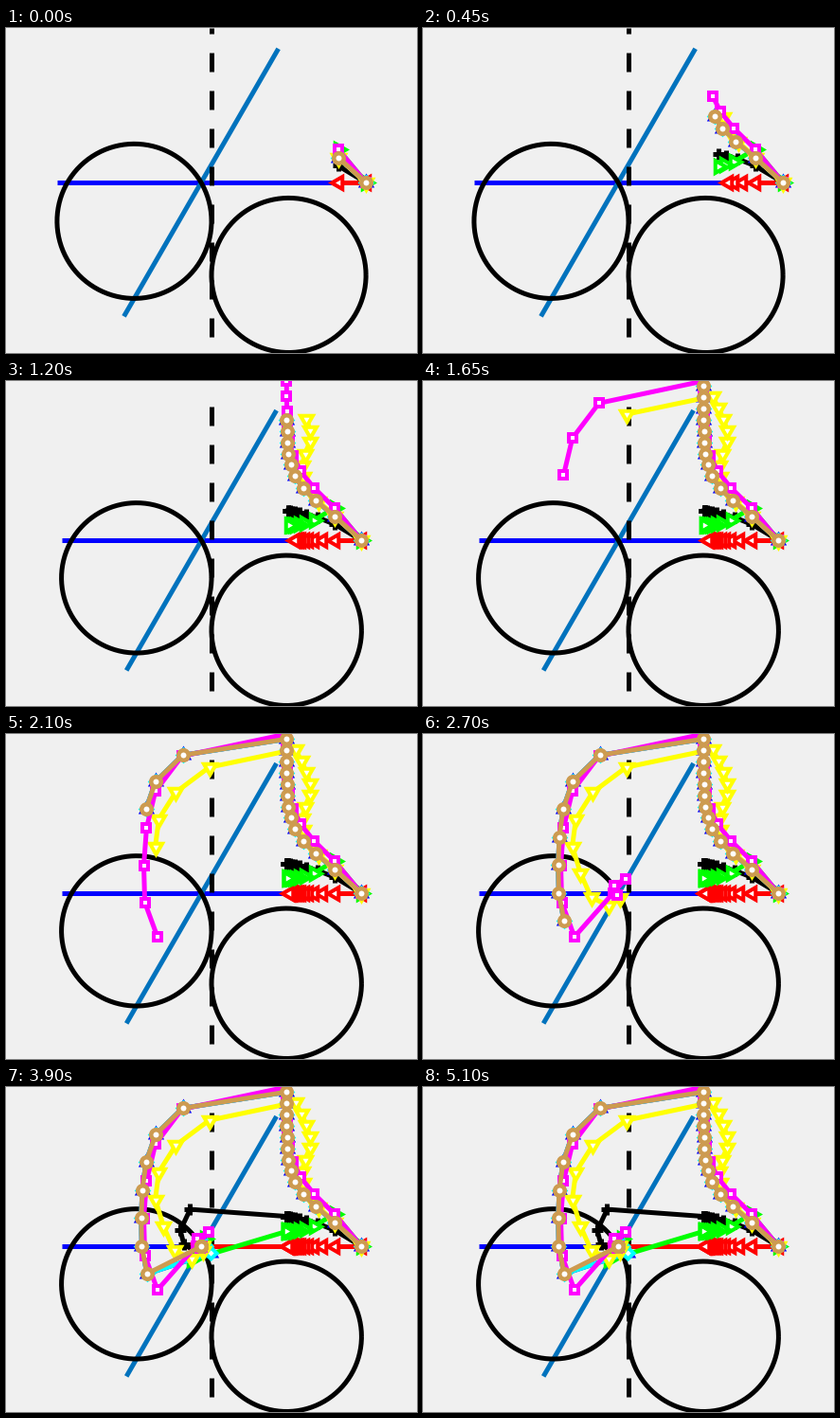
Write a matplotlib script that moves like this. It is 434 by 343 pixels and loops after 5.85 s.

```python
import numpy as np
import matplotlib.pyplot as plt
from matplotlib.animation import FuncAnimation

W, H, DPI = 434, 343, 100
PX = 72 / DPI                      # one pixel in points
STEPS, HOLD = 35, 4
KICK = 20                          # iteration that starts from the slanted line
BETA = 0.75

CENTERS = np.array([[-1.0, -0.5], [1.0, -1.2]])
ROOT = np.array([np.sqrt(0.75) - 1, 0.0])
SLOPE = np.array([0.5, np.sqrt(0.75)])


def nearest(x, y):
    """Project onto the nearer of the two unit circles."""
    d = np.array([x, y]) - CENTERS
    r = np.hypot(d[:, 0], d[:, 1])
    i = np.argmin(abs(r - 1))
    return CENTERS[i] + d[i] / r[i]


def alternating(x, y):
    return nearest(x, y)[0], 0.0


def reflected(x, y):
    px, py = nearest(x, y)
    return px, -py


def averaged(x, y):
    px, py = nearest(x, y)
    return px, BETA * (y - py) + (1 - BETA) * py


def douglas_rachford(x, y):
    px, py = nearest(x, y)
    return px, y - py


def hybrid(x, y):
    px, py = nearest(x, y)
    return px, y - BETA * py


def difference_map(x, y):
    px, py = nearest(x, y / BETA)
    return BETA * px + (1 - BETA) * nearest(x, -y)[0], y - BETA * py


def iterate(step, direct=False):
    path = [np.array([2.0, 0.0])]
    for n in range(1, STEPS + 1):
        p = path[-1]
        if n == KICK:
            p = ROOT + SLOPE * np.dot(p - ROOT, SLOPE)
        if direct and n >= KICK:
            path.append(ROOT)
        else:
            path.append(np.array(step(*p)))
    return np.array(path)


def triangle(angle):
    return (3, 0, angle)


# step, colour, marker, marker size, edge width, jumps to the solution
METHODS = [
    (alternating, "#ff0000", triangle(90), 15, 4, False),
    (averaged, "#000000", "+", 12, 5, False),
    (reflected, "#00ff00", triangle(270), 15, 4, False),
    (hybrid, "#0000ff", triangle(0), 12, 4, False),
    (hybrid, "#00ffff", (4, 0, 0), 12, 4, False),
    (difference_map, "#ffff00", triangle(180), 15, 4, False),
    (douglas_rachford, "#ff00ff", "s", 8, 4, False),
    (hybrid, "#cd9b50", "o", 10.5, 4.5, True),
]
paths = [iterate(m[0], m[5]) for m in METHODS]

fig = plt.figure(figsize=(W / DPI, H / DPI), dpi=DPI, facecolor="#f0f0f0")
ax = fig.add_axes([0, 0, 1, 1])
ax.axis("off")


def stroke(x, y, color, width=5, **kw):
    ax.plot(x, y, color=color, lw=width * PX, solid_capstyle="butt", **kw)


stroke([-2, 2], [0, 0], "#0000ff")
ends = ROOT + np.outer([-2, 2], SLOPE)
stroke(ends[:, 0], ends[:, 1], "#0072bd")
t = np.linspace(0, 2 * np.pi, 200)
for cx, cy in CENTERS:
    stroke(cx + np.cos(t), cy + np.sin(t), "#000000")
stroke([0, 0], [-2, 2], "#000000", linestyle=(0, (4, 4)), dash_capstyle="butt")

traces = []
for _, color, marker, size, edge, _ in METHODS:
    line, = ax.plot([], [], color=color, lw=5 * PX, marker=marker,
                    ms=size * PX, mew=edge * PX, mec=color, mfc="white")
    traces.append(line)


def draw(frame):
    count = min(frame, STEPS - 1) + 2
    top = 2.0
    for line, path in zip(traces, paths):
        line.set_data(path[:count, 0], path[:count, 1])
        top = max(top, path[:count, 1].max())
    unit = (H - 0.5) / (top + 2.2)     # pixels per unit, fits all data tightly
    ax.set_xlim(-W / 2 / unit, W / 2 / unit)
    ax.set_ylim(top - H / unit, top)
    return traces


anim = FuncAnimation(fig, draw, frames=STEPS + HOLD, interval=150,
                     init_func=lambda: draw(0), repeat=True, repeat_delay=0,
                     blit=False)
plt.show()
```
